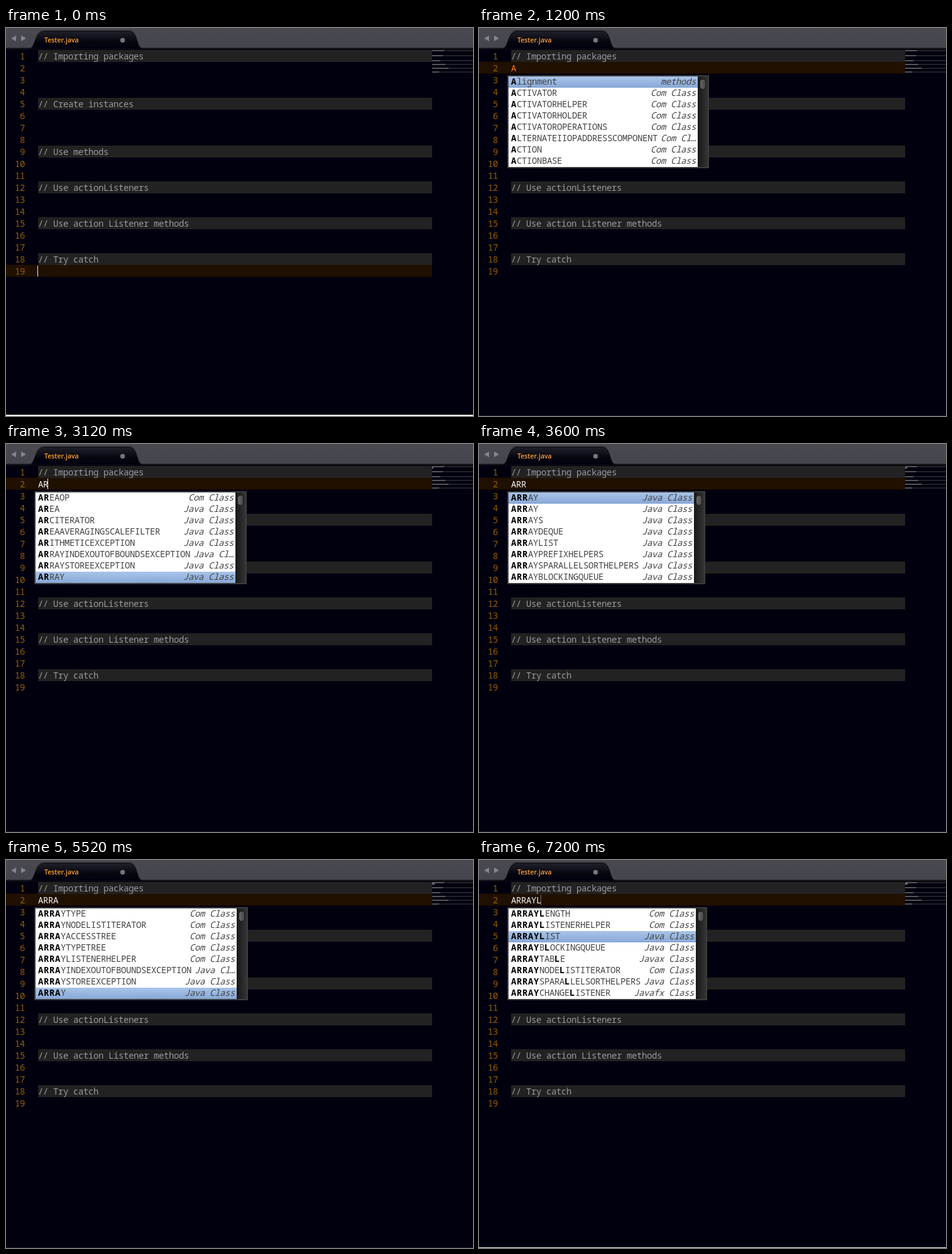
Animation, 743 px wide and 617 px high, one loop 8 s. Source, as an HTML page:

```html
<!DOCTYPE html>
<html lang="en">
<head>
<meta charset="utf-8">
<title>Code completion</title>
<style>
html, body { margin: 0; width: 100%; height: 100%; overflow: hidden; background: #00000f; }
svg { display: block; }
.code { font: 14px "Noto Sans Mono", "DejaVu Sans Mono", monospace; letter-spacing: -.4px; white-space: pre; }
.hit { font-weight: 700; letter-spacing: .6px; fill: #000; }
.kind { font-style: italic; }
.tab { font: 600 10.5px "Open Sans", "Noto Sans", sans-serif; }
</style>
</head>
<body>
<svg width="743" height="617" viewBox="0 0 743 617">
  <defs>
    <linearGradient id="bar" x2="0" y2="1">
      <stop stop-color="#494951"/><stop offset="1" stop-color="#45454d"/>
    </linearGradient>
    <linearGradient id="tab" x2="0" y2="1">
      <stop stop-color="#20202b"/><stop offset=".6" stop-color="#06060f"/><stop offset="1" stop-color="#00000f"/>
    </linearGradient>
    <linearGradient id="pick" x2="0" y2="1">
      <stop stop-color="#a9c4e8"/><stop offset="1" stop-color="#88a8d6"/>
    </linearGradient>
    <linearGradient id="track">
      <stop stop-color="#181818"/><stop offset="1" stop-color="#343434"/>
    </linearGradient>
    <linearGradient id="thumb">
      <stop stop-color="#686868"/><stop offset="1" stop-color="#484848"/>
    </linearGradient>
  </defs>
  <rect width="743" height="617" fill="#00000f"/>
  <rect width="743" height="32" fill="url(#bar)"/>
  <rect y="31" width="743" height="1" fill="#303036"/>
  <rect y="32" width="743" height="2" fill="#111114"/>
  <path d="M38 33C47 31 46 5 60 5H196C210 5 207 31 217 33Z" fill="url(#tab)"/>
  <path d="M38 32.5C47 31 46 4.5 60 4.5H196C210 4.5 207 31 217 32.5" fill="none" stroke="#0a0a0e"/>
  <path d="M16 12V21L8 16.500ZM24 12V21L32 16.500Z" fill="#85858b"/>
  <text class="tab" x="61" y="23" fill="#ffa333">Tester.java</text>
  <circle cx="185.500" cy="19.500" r="3.700" fill="#76767c"/>
  <g id="view"></g>
</svg>
<script>
const view = document.getElementById('view');
const LINE = 19, TOP = 35, CHAR = 8, LEFT = 51, LOOP = 8000, STEP = 1200;

const comments = {
  1: 'Importing packages', 5: 'Create instances', 9: 'Use methods',
  12: 'Use actionListeners', 15: 'Use action Listener methods', 18: 'Try catch'
};
// Minimap text widths, in line order
const mini = [19, 17, 13, 21, 26, 11];

const C = 'Com Class', J = 'Java Class';
const states = [
  { typed: '', caret: 1 },
  { typed: 'A', edge: 348, pick: 0, rows: [
    ['Alignment', 'methods'], ['ACTIVATOR', C], ['ACTIVATORHELPER', C], ['ACTIVATORHOLDER', C],
    ['ACTIVATOROPERATIONS', C], ['ALTERNATEIIOPADDRESSCOMPONENT', 'Com Cl…'], ['ACTION', C], ['ACTIONBASE', C]] },
  { typed: 'AR', edge: 365, pick: 7, caret: 1, rows: [
    ['AREAOP', C], ['AREA', J], ['ARCITERATOR', J], ['AREAAVERAGINGSCALEFILTER', J],
    ['ARITHMETICEXCEPTION', J], ['ARRAYINDEXOUTOFBOUNDSEXCEPTION', 'Java Cl…'], ['ARRAYSTOREEXCEPTION', J], ['ARRAY', J]] },
  { typed: 'ARR', edge: 342, pick: 0, rows: [
    ['ARRAY', J], ['ARRAY', J], ['ARRAYS', J], ['ARRAYDEQUE', J],
    ['ARRAYLIST', J], ['ARRAYPREFIXHELPERS', J], ['ARRAYSPARALLELSORTHELPERS', J], ['ARRAYBLOCKINGQUEUE', J]] },
  { typed: 'ARRA', edge: 367, pick: 7, rows: [
    ['ARRAYTYPE', C], ['ARRAYNODELISTITERATOR', C], ['ARRAYACCESSTREE', C], ['ARRAYTYPETREE', C],
    ['ARRAYLISTENERHELPER', C], ['ARRAYINDEXOUTOFBOUNDSEXCEPTION', 'Java Cl…'], ['ARRAYSTOREEXCEPTION', J], ['ARRAY', J]] },
  { typed: 'ARRAY', edge: 331, pick: 0, rows: [
    ['ARRAY', J], ['ARRAY', J], ['ARRAYNOTIFICATIONBUFFER', C], ['ARRAYQUEUE', C],
    ['ARRAYINSTRUCTION', C], ['ARRAYLENGTH', C], ['ARRAYTYPE', C], ['ARRAYNODELISTITERATOR', C]] },
  { typed: 'ARRAYL', edge: 345, pick: 2, caret: .4, rows: [
    ['ARRAYLENGTH', C], ['ARRAYLISTENERHELPER', C], ['ARRAYLIST', J], ['ARRAYBLOCKINGQUEUE', J],
    ['ARRAYTABLE', 'Javax Class'], ['ARRAYNODELISTITERATOR', C], ['ARRAYSPARALLELSORTHELPERS', J], ['ARRAYCHANGELISTENER', 'Javafx Class']] }
];

const rect = (x, y, w, h, fill, more = '') =>
  `<rect x="${x}" y="${y}" width="${w}" height="${h}" fill="${fill}" ${more}/>`;
const text = (x, y, s, fill, cls = '') =>
  `<text class="code ${cls}" x="${x}" y="${y}" fill="${fill}">${s}</text>`;
const lineY = n => TOP + (n - 1) * LINE;

// Embolden the typed letters, matched in order
function mark(word, typed) {
  let k = 0;
  return [...word].map(c => {
    if (c !== typed[k]) return c;
    k++;
    return `<tspan class="hit">${c}</tspan>`;
  }).join('');
}

function editor({ typed, caret }) {
  const active = typed ? 2 : 19;
  let out = rect(0, lineY(active) - 0.5, 678, LINE, '#201000');
  for (let n = 1; n <= 19; n++) {
    const y = lineY(n), label = String(n);
    out += text(30 - label.length * CHAR, y + 15, label, '#945e00');
    if (comments[n]) {
      out += rect(LEFT, y, 678 - LEFT, LINE, '#222') + text(LEFT, y + 15, '// ' + comments[n], '#999');
    }
  }
  Object.keys(comments).forEach((n, i) => {
    const y = TOP + (n - 1) * 2;
    out += rect(678, y, 65, 2, '#222227') + rect(678, y, mini[i], 2, '#55555a');
  });
  if (typed) {
    out += text(LEFT, lineY(2) + 15, typed, typed === 'A' ? '#ff7d2d' : '#f4f4f4');
    if (typed.length > 1) out += rect(678, 37, Math.min(typed.length, 4), 2, '#77777c');
  }
  if (caret) {
    const x = LEFT - 1 + typed.length * CHAR;
    out += rect(x, lineY(active) + 1, 1, 17, '#f0f0f0', `opacity="${caret}"`);
  }
  return out;
}

function popup({ typed, edge, pick, rows }) {
  let out = rect(45, 75, edge - 27, 148, '#3c3c3c')
    + rect(47, 77, edge - 47, 144, '#fff')
    + rect(edge, 77, 16, 144, 'url(#track)')
    + rect(edge + 3.5, 81.5, 9, 16, 'url(#thumb)', 'rx="4.5" stroke="#191919"');
  rows.forEach(([word, kind], i) => {
    const y = 77 + i * 18;
    if (i === pick) out += rect(47, y, edge - 47, 18, 'url(#pick)');
    out += text(LEFT, y + 13, mark(word, typed), '#444')
      + text(edge - 3 - kind.length * CHAR, y + 13, kind, '#444', 'kind');
  });
  return out;
}

let shown = -1;
function draw(ms) {
  const i = Math.min(6, Math.floor(ms % LOOP / STEP));
  if (i === shown) return;
  shown = i;
  const s = states[i];
  const foot = i === 0 ? rect(0, 615, 743, 2, '#fff') : rect(0, 616, 743, 1, i === 6 ? '#fff' : '#1a1a20');
  view.innerHTML = editor(s) + (s.rows ? popup(s) : '') + foot;
}

const start = performance.now();
function tick() {
  draw(performance.now() - start);
  requestAnimationFrame(tick);
}
tick();
</script>
</body>
</html>
```
